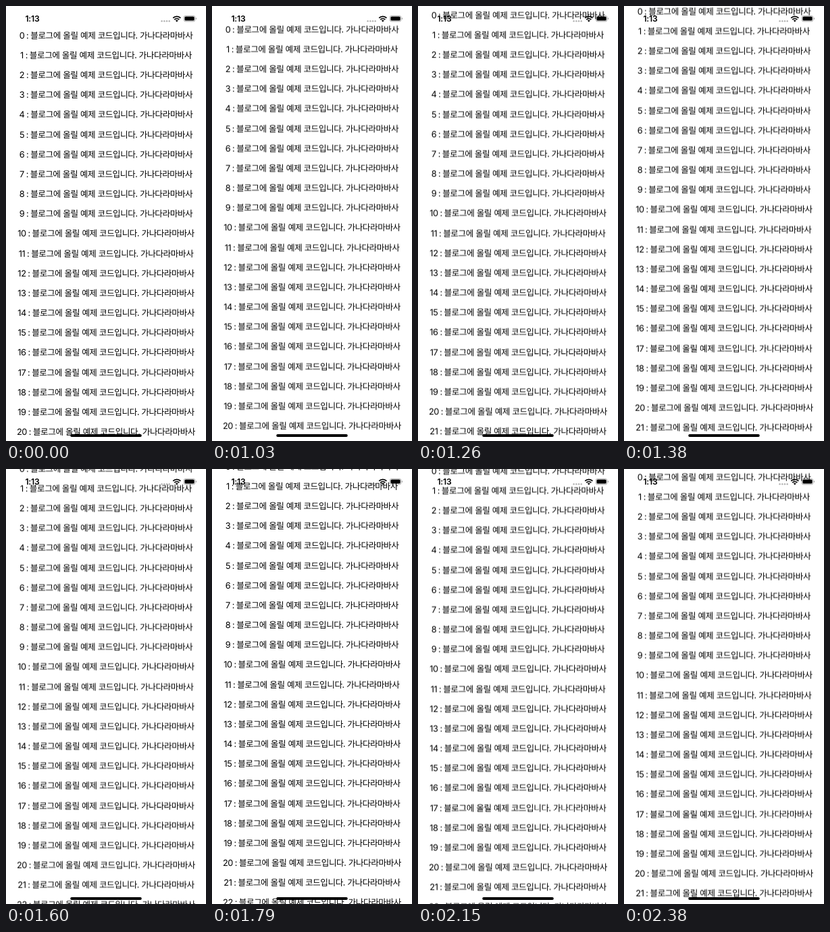
Animation, 296 px wide and 640 px high, one loop 2490 ms. Source, as an HTML page:

```html
<!DOCTYPE html>
<html lang="ko">
<head>
<meta charset="utf-8">
<title>Scrolling list</title>
<style>
  html, body { margin: 0; width: 100%; height: 100%; overflow: hidden; background: #fff; }
  svg { display: block; width: 296px; height: 640px; }
  text { white-space: pre; }
  .row {
    font: 400 12.6px "Noto Sans CJK KR", "Noto Sans KR", "Noto Sans CJK JP", sans-serif;
    letter-spacing: -.4px;
    word-spacing: .2px;
    text-anchor: middle;
    text-rendering: geometricPrecision;
  }
  .index { font-family: Inter, sans-serif; font-size: 12.8px; word-spacing: -.4px; }
  .clock { font: 600 12.2px Inter, sans-serif; letter-spacing: -.2px; }
  #list { animation: scroll 2490ms step-end infinite; }

  /* drag up, settle, then drift back */
  @keyframes scroll {
    0%      { transform: translateY(0); }
    41.36%  { transform: translateY(-8.8px); }
    46.18%  { transform: translateY(-22.3px); }
    50.60%  { transform: translateY(-29.8px); }
    55.42%  { transform: translateY(-35.4px); }
    59.83%  { transform: translateY(-40px); }
    64.25%  { transform: translateY(-43.7px); }
    71.88%  { transform: translateY(-47px); }
    76.30%  { transform: translateY(-46.2px); }
    81.12%  { transform: translateY(-44px); }
    86.34%  { transform: translateY(-40.5px); }
    90.76%  { transform: translateY(-36.4px); }
    95.58%, 100% { transform: translateY(-31.4px); }
  }
</style>
</head>
<body>
<svg viewBox="0 0 296 640">
  <g id="list"></g>

  <text class="clock" x="28.4" y="23.2">1:13</text>

  <g fill="#000" fill-opacity=".3">
    <circle cx="230.6" cy="22.3" r="1.2"/>
    <circle cx="234.3" cy="22.3" r="1.2"/>
    <circle cx="238" cy="22.3" r="1.2"/>
    <circle cx="241.7" cy="22.3" r="1.2"/>
  </g>

  <g fill="none" stroke="#000" stroke-width="1.8">
    <path d="M247.2 17.7a8 8 0 0 1 11.2 0"/>
    <path d="M249.3 20a5 5 0 0 1 7 0"/>
    <path d="M252.8 23.4l-1.9-1.9a2.7 2.7 0 0 1 3.8 0z" fill="#000" stroke="none"/>
  </g>

  <rect x="263.2" y="14.4" width="16.7" height="8.4" rx="2.5" fill="none" stroke="#000" stroke-opacity=".38" stroke-width=".8"/>
  <rect x="264.4" y="15.6" width="14.3" height="6" rx="1.5"/>
  <path d="M280.9 17.1q1.1.4 1.1 1.5t-1.1 1.5z" fill-opacity=".4"/>

  <rect x="95.2" y="629.9" width="105.6" height="4" rx="2"/>
</svg>
<script>
  const PITCH = 29.16, FIRST = 47.8, COUNT = 24;
  const row = (_, i) =>
    `<text class="row" x="148" y="${(FIRST + i * PITCH).toFixed(2)}">` +
    `<tspan class="index">${i} : </tspan>블로그에 올릴 예제 코드입니다. 가나다라마바사</text>`;
  document.getElementById('list').innerHTML = Array.from({ length: COUNT }, row).join('');
</script>
</body>
</html>
```
